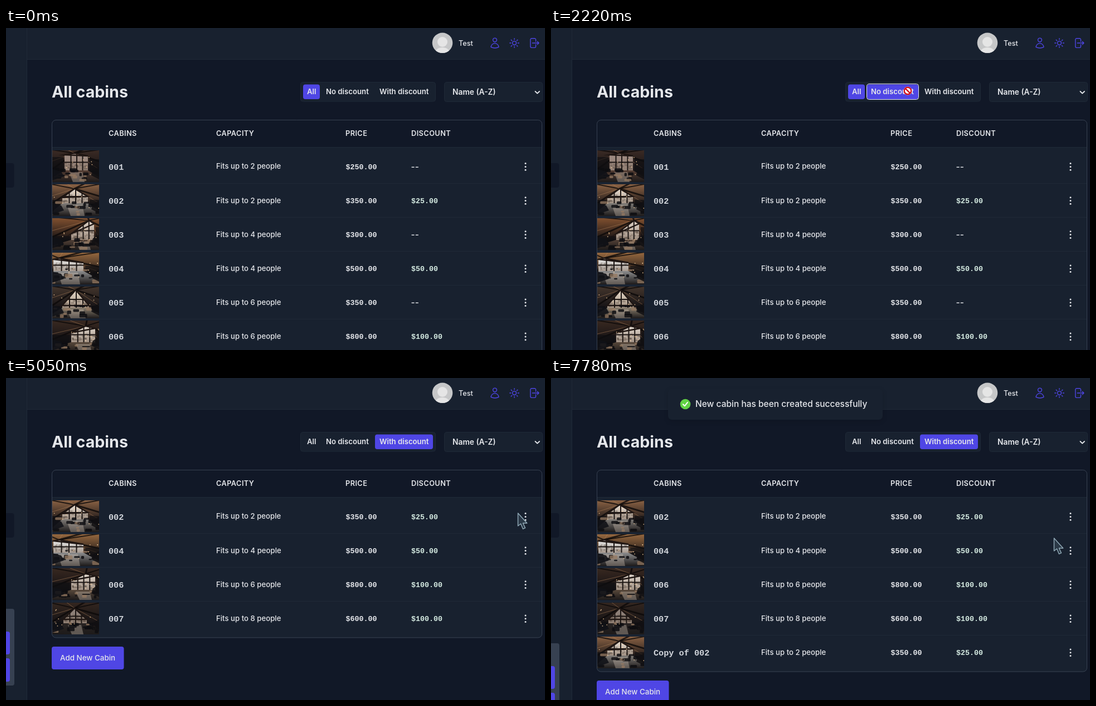
Write an HTML page with a canvas that moves like this. It is 967 px wide and 579 px high and loops after 8000 ms.

```html
<!DOCTYPE html>
<html lang="en">
<head>
<meta charset="utf-8">
<title>All cabins</title>
<style>
html, body { margin: 0; width: 100%; height: 100%; overflow: hidden; background: #111827; }
canvas { display: block; }
</style>
</head>
<body>
<canvas id="stage" width="967" height="579"></canvas>
<script>
const LOOP = 8000, STEP = 70;
const PANEL = '#18212f', PAGE = '#111827', LINE = '#1f2937', EDGE = '#374151';
const BRAND = '#4f46e5', TEXT = '#e5e7eb', SOFT = '#d1d5db', MINT = '#d5ebe2';
const SANS = 'Inter, "Open Sans", sans-serif';
const MONO = '"Liberation Mono", "DejaVu Sans Mono", monospace';

const stage = document.getElementById('stage');
let g = stage.getContext('2d');

// ---------- helpers ----------
const clamp = v => Math.max(0, Math.min(1, v));
const ramp = (t, a, b) => clamp((t - a) / (b - a));
const during = (t, a, b) => t >= a && t < b;
const inside = (p, x, y, w, h) => p.x >= x && p.x < x + w && p.y >= y && p.y < y + h;

function rect(x, y, w, h, color) {
  g.fillStyle = color;
  g.fillRect(x, y, w, h);
}

function round(x, y, w, h, r, fill, stroke) {
  g.beginPath();
  g.roundRect(x, y, w, h, r);
  if (fill) { g.fillStyle = fill; g.fill(); }
  if (stroke) { g.strokeStyle = stroke; g.lineWidth = 1; g.stroke(); }
}

function disc(x, y, r, color) {
  g.beginPath();
  g.arc(x, y, r, 0, Math.PI * 2);
  g.fillStyle = color;
  g.fill();
}

function poly(points, color) {
  g.beginPath();
  points.forEach(([x, y]) => g.lineTo(x, y));
  g.closePath();
  if (color) { g.fillStyle = color; g.fill(); }
}

function label(s, x, cy, size, weight = 400, color = TEXT, family = SANS, spacing = 0) {
  g.font = `${weight} ${size}px ${family}`;
  g.letterSpacing = spacing + 'px';
  g.fillStyle = color;
  g.fillText(s, x, cy + size * (family === MONO ? 0.33 : 0.36));
}

function shade(y0, y1, a, b) {
  const s = g.createLinearGradient(0, y0, 0, y1);
  s.addColorStop(0, a);
  s.addColorStop(1, b);
  return s;
}

function random(seed) {
  return () => {
    seed = (seed * 16807) % 2147483647;
    return seed / 2147483647;
  };
}

// ---------- room thumbnails ----------
const W = 84, H = 57;
// wood, sky, floor, then window: left, right, left top, apex x, apex y, right top, bottom
const ROOMS = [
  ['#3a2a24', '#a08c84', '#5c4236', 22, 64, 8, 40, 5, 10, 36],
  ['#8a6244', '#e6ddd2', '#8d8984', 18, 64, 24, 40, 8, 22, 34],
  ['#80502f', '#dfd3c8', '#5a463a', 34, 75, 28, 66, 4, 10, 39],
  ['#96683f', '#eceded', '#9a9b9c', 2, 56, 12, 12, 10, 18, 33],
  ['#43352c', '#e8dccb', '#9b8f7c', 18, 66, 34, 42, 6, 34, 38],
  ['#382820', '#e0d7cd', '#625040', 34, 77, 22, 60, 10, 14, 39],
  ['#33261f', '#8c807a', '#2b2624', 20, 62, 30, 40, 10, 30, 37],
  ['#2b2523', '#dfdfdd', '#75675a', 16, 54, 20, 46, 6, 6, 38]
];

function room([wood, sky, floor, l, r, tl, ax, ay, tr, b], i) {
  const c = document.createElement('canvas');
  c.width = W;
  c.height = H;
  g = c.getContext('2d');
  const rnd = random(911 + i * 577);

  rect(0, 0, W, H, shade(0, 40, wood, '#131114'));
  for (let k = 0; k <= 8; k++) {
    g.strokeStyle = k % 3 ? 'rgba(12,9,9,.8)' : 'rgba(190,140,95,.45)';
    g.lineWidth = 1 + k % 3;
    g.beginPath();
    g.moveTo(ax, ay);
    g.lineTo(k * W / 4 - W / 2, k % 2 ? -4 : 34);
    g.stroke();
  }
  rect(0, tl + 4, l - 2, b - tl, 'rgba(14,14,17,.65)');
  rect(r + 3, tr + 6, W - r, b - tr, 'rgba(14,14,17,.65)');

  g.save();
  poly([[l, b], [l, tl], [ax, ay], [r, tr], [r, b]], shade(ay, b + 8, sky, '#8f7d6f'));
  g.clip();
  for (let k = 0; k < 26; k++) {
    rect(l + rnd() * (r - l), b - 4 - rnd() * 12, 2 + rnd() * 4, 3, 'rgba(75,60,50,.3)');
  }
  g.fillStyle = '#1b1513';
  for (let k = 1; k < 4; k++) g.fillRect(l + (r - l) * k / 4, 0, 2, H);
  g.fillRect(0, (ay + b) / 2, W, 2);
  g.restore();
  poly([[l, tl], [ax, ay], [r, tr]]);
  g.strokeStyle = '#1f1613';
  g.lineWidth = 2.4;
  g.stroke();

  poly([[0, 49], [l, b], [r, b], [W, 48], [W, H], [0, H]], shade(b - 3, H, floor, '#1d1a1a'));
  poly([[l + 8, b + 3], [r - 10, b + 3], [r - 6, H], [l + 15, H]], 'rgba(232,218,202,.32)');
  for (let k = 0; k < 18; k++) {
    const x = rnd() * W, y = b + rnd() * (H - b) - 5;
    round(x - 6, y, 4 + rnd() * 11, 2 + rnd() * 5, 1.5, k % 4 ? 'rgba(13,13,16,.85)' : 'rgba(150,122,98,.75)');
  }
  poly([[0, 34], [16, 38], [21, 47], [0, 54]], 'rgba(17,18,23,.9)');
  poly([[W, 30], [73, 36], [70, 45], [W, 52]], 'rgba(17,16,18,.88)');
  for (let k = 0; k < 9; k++) disc(rnd() * W, 12 + rnd() * 32, 0.9, 'rgba(255,212,160,.8)');
  return c;
}

const photos = ROOMS.map(room);
g = stage.getContext('2d');

// ---------- data ----------
const cabin = (id, people, price, discount) =>
  ({ id, name: '00' + id, people, price: '$' + price + '.00', discount });
const ALL = [
  cabin(1, 2, '250', 0), cabin(2, 2, '350', 25), cabin(3, 4, '300', 0), cabin(4, 4, '500', 50),
  cabin(5, 6, '350', 0), cabin(6, 6, '800', 100), cabin(7, 8, '600', 100), cabin(8, 10, '1,400', 0)
];
const PLAIN = ALL.filter(c => !c.discount);
const REDUCED = ALL.filter(c => c.discount);
const COPIED = [...REDUCED, { ...ALL[1], name: 'Copy of 002' }];

const rowsAt = t => t < 2290 ? ALL : t < 3690 ? PLAIN : t < 7510 ? REDUCED : COPIED;
const menuOpen = t => during(t, 5540, 7300);

// ---------- pointer ----------
const TRACK = [
  [130, 873, 184], [480, 928, 262], [560, 932, 280], [760, 934, 261], [900, 934, 260],
  [1439, 934, 260], [1440, 871, 213], [2080, 640, 113], [2290, 640, 113], [2890, 714, 109],
  [4640, 714, 109], [5050, 918, 243], [5270, 931, 245], [6080, 931, 245], [6570, 902, 288],
  [LOOP, 902, 288]
];
const CLICKS = [[2080, 2220], [3620, 3830], [5470, 5610], [7230, 7300]];

function pointer(t) {
  const i = TRACK.findIndex((k, n) => n < TRACK.length - 1 && t < TRACK[n + 1][0]);
  const [t0, x0, y0] = TRACK[i], [t1, x1, y1] = TRACK[i + 1];
  const u = clamp(Math.floor((t - t0) / STEP) * STEP / (t1 - t0));
  const e = u * u * (3 - 2 * u);
  return { x: x0 + (x1 - x0) * e, y: y0 + (y1 - y0) * e };
}

function shape(p, t) {
  const active = t < 2220 ? 0 : t < 3760 ? 1 : 2;
  const over = TABS.findIndex(b => inside(p, b.x, 101, b.w, 27));
  if (over >= 0) return over === active ? 'no' : 'hand';
  if (menuOpen(t) && inside(p, 796, 271, 136, 111)) return 'hand';
  return inside(p, 920, 235, 27, 29) ? 'hand' : 'arrow';
}

const HAND = new Path2D('M6 17V2.5Q8 -.8 10.3 2.5V10Q12.6 7.6 14.4 10.2V11Q16.8 9.2 18.4 11.8V13' +
  'Q21 11.6 22 14V20L19.4 25V29H8.6V26L3 20L.8 16Q1 12.8 4 14.2Z');
const FINGERS = new Path2D('M10.3 10V16M14.4 11V16M18.4 13V17');
const ARROW = new Path2D('M0 0V23L5 19L9 28.4L13 26.6L9 18H16.3Z');

function drawPointer(t) {
  if (t < 130) return;
  const p = pointer(t), kind = shape(p, t);
  if (CLICKS.some(([a, b]) => during(t, a, b))) disc(p.x - 1, p.y - 1, 11, 'rgba(188,180,8,.72)');
  g.save();
  g.translate(Math.round(p.x), Math.round(p.y));
  if (kind === 'no') {
    disc(0, 0, 7.6, '#fff');
    g.strokeStyle = '#d3121c';
    g.lineWidth = 2.4;
    g.beginPath();
    g.arc(0, 0, 6.2, 0, Math.PI * 2);
    g.moveTo(-4.4, -4.4);
    g.lineTo(4.4, 4.4);
    g.stroke();
  } else {
    const hand = kind === 'hand', path = hand ? HAND : ARROW;
    if (hand) g.translate(-8, 0);
    else g.translate(0.5, 0);
    g.lineJoin = 'round';
    g.lineWidth = 1.4;
    g.fillStyle = hand ? '#24374a' : '#2b3947';
    g.strokeStyle = '#92abb8';
    g.fill(path);
    g.stroke(path);
    if (hand) g.stroke(FINGERS);
  }
  g.restore();
}

// ---------- page ----------
const ICONS = [
  [877, 'M15.75 6a3.75 3.75 0 1 1-7.5 0 3.75 3.75 0 0 1 7.5 0ZM4.5 20.1a7.5 7.5 0 0 1 15 0A17.9 17.9 0 0 1 12 21.75c-2.7 0-5.2-.6-7.5-1.65Z'],
  [912, 'M12 3v2.25m6.36.39-1.6 1.6M21 12h-2.25m-.39 6.36-1.6-1.6M12 18.75V21m-4.77-4.23-1.6 1.6M5.25 12H3m4.23-4.77L5.64 5.64M15.75 12a3.75 3.75 0 1 1-7.5 0 3.75 3.75 0 0 1 7.5 0Z'],
  [947, 'M15.75 9V5.25A2.25 2.25 0 0 0 13.5 3h-6a2.25 2.25 0 0 0-2.25 2.25v13.5A2.25 2.25 0 0 0 7.5 21h6a2.25 2.25 0 0 0 2.25-2.25V15m3 0 3-3m0 0-3-3m3 3H9']
].map(([x, d]) => ({ x, path: new Path2D(d) }));

const TABS = [
  { s: 'All', x: 533, w: 30, tx: 540, on: t => 1 - ramp(t, 2220, 2520) },
  { s: 'No discount', x: 567, w: 92, tx: 574, on: t => ramp(t, 1960, 2160) - ramp(t, 3690, 3970) },
  { s: 'With discount', x: 662, w: 104, tx: 670, on: t => ramp(t, 2500, 2800) }
];

function drawFrame(bottom) {
  rect(0, 0, 967, 579, PAGE);
  rect(0, 0, 37, 579, PANEL);
  rect(38, 0, 929, 56, PANEL);
  rect(37, 0, 1, 579, LINE);
  rect(38, 56, 929, 1, LINE);
  round(-10, 243, 24.5, 44, 4, PAGE);

  const y = Math.round(bottom) - 52;
  round(-10, y, 25, 138, 4, EDGE);
  round(-10, y + 41, 17, 41, 4, BRAND);
  round(-10, y + 89, 17, 42, 4, BRAND);

  g.save();
  disc(783, 26.8, 18.3, '#c6c7c8');
  g.clip();
  disc(783, 25, 9, '#e5e5e5');
  g.beginPath();
  g.ellipse(783, 46, 14, 11, 0, 0, Math.PI * 2);
  g.fill();
  g.restore();
  label('Test', 812, 27, 12.7, 500);

  g.strokeStyle = BRAND;
  g.lineCap = g.lineJoin = 'round';
  for (const { x, path } of ICONS) {
    g.save();
    g.translate(x - 11, 16);
    g.scale(0.92, 0.92);
    g.lineWidth = 1.5;
    g.stroke(path);
    g.restore();
  }
}

function drawTools(t) {
  label('All cabins', 82, 114.5, 28.6, 700);
  round(528.5, 97.5, 242, 34.5, 4, PANEL, LINE);
  for (const b of TABS) {
    g.globalAlpha = clamp(b.on(t));
    round(b.x, 101.5, b.w, 26.5, 4, BRAND);
    g.globalAlpha = 1;
    if (b === TABS[1] && during(t, 2080, 2290)) round(566.5, 100.5, 93, 28, 4, null, TEXT);
    label(b.s, b.tx, 114.3, 13.2, 600);
  }
  round(786.5, 97.5, 176, 35, 4, PANEL, LINE);
  label('Name (A-Z)', 801, 115, 13.8, 600);
  g.strokeStyle = TEXT;
  g.lineWidth = 1.9;
  g.beginPath();
  g.moveTo(949.5, 114);
  g.lineTo(953.2, 117.6);
  g.lineTo(957, 114);
  g.stroke();
}

function drawTable(rows, bottom, t) {
  g.save();
  g.beginPath();
  g.roundRect(82, 165, 880, bottom - 165, 7);
  g.clip();
  rect(82, 165, 880, 49, PAGE);
  rect(82, 214, 880, 500, PANEL);
  rect(82, 214, 880, 1, LINE);
  [['CABINS', 184], ['CAPACITY', 377], ['PRICE', 609], ['DISCOUNT', 727]]
    .forEach(([s, x]) => label(s, x, 189.8, 12.8, 600, TEXT, SANS, 0.4));

  const hover = ramp(t, 400, 600) - ramp(t, 1430, 1560) + ramp(t, 5060, 5260) - ramp(t, 6150, 6350);
  g.globalAlpha = clamp(hover);
  round(917.5, 235, 29.5, 29, 4, LINE);
  g.globalAlpha = 1;

  rows.forEach((c, i) => {
    const y = 249 + 61.1 * i;
    g.drawImage(photos[c.id - 1], 83, Math.round(y - 28.8));
    label(c.name, 184, y + 0.5, 15.2, 700, SOFT, MONO);
    label(`Fits up to ${c.people} people`, 377, y - 0.3, 13.2, 500);
    label(c.price, 609.5, y + 0.5, 13.3, 700, TEXT, MONO);
    if (c.discount) label(`$${c.discount}.00`, 727, y + 0.5, 13.3, 700, MINT, MONO);
    else label('--', 726.5, y, 15.5, 500);
    for (const d of [-5.8, 0, 5.8]) disc(932, y + 0.4 + d, 1.5, TEXT);
    if (i < rows.length - 1) rect(82, Math.round(y + 30), 880, 1, LINE);
  });
  g.restore();
  round(82.5, 165.5, 879, bottom - 166, 7, null, EDGE);

  round(82, bottom + 15.5, 129.5, 41, 4, BRAND);
  label('Add New Cabin', 97, bottom + 36, 13.4, 500);
}

function drawMenu(t) {
  if (!menuOpen(t)) return;
  g.save();
  g.shadowColor = 'rgba(0,0,0,.36)';
  g.shadowBlur = 24;
  g.shadowOffsetY = 6;
  round(796, 271, 136, 111, 5, '#17202d');
  g.restore();
  if (t >= 6220) round(796, 271, 136, 38, 4, PAGE);
  if (t >= 7230) {
    g.strokeStyle = '#f3f4f6';
    g.lineWidth = 1;
    g.strokeRect(795.5, 271.5, 136, 37);
  }
  ['Duplicate', 'Edit', 'Delete'].forEach((s, i) => label(s, 847, 290 + 37 * i, 13.5, 500));

  const grey = '#6b7280';
  round(819.5, 284, 8, 8, 1.5, grey);
  round(822, 286.5, 10, 10, 2, t >= 6220 ? PAGE : PANEL);
  round(823, 287.5, 8, 8, 1.5, grey);
  poly([[819, 333], [820, 329], [827.5, 321.5], [830.5, 324.5], [823, 332]], grey);
  disc(830, 322, 1.9, grey);
  round(820, 359, 11, 2, 1, grey);
  round(823, 357.3, 5, 2, 1, grey);
  poly([[821, 361.5], [830, 361.5], [829.3, 370], [821.7, 370]], grey);
  for (const x of [823, 825.2, 827.4]) rect(x, 363, 0.8, 5, PANEL);
}

function drawToast(t) {
  if (t < 7440) return;
  const u = 1 - Math.pow(1 - ramp(t, 7440, 7770), 3);
  const k = 0.6 + 0.4 * u;
  g.save();
  g.globalAlpha = 0.5 + 0.5 * u;
  g.translate(402.5, 47 - 114 * (1 - u));
  g.scale(k, k);
  g.translate(-402.5, -47);
  g.save();
  g.shadowColor = 'rgba(0,0,0,.12)';
  g.shadowBlur = 10;
  g.shadowOffsetY = 3;
  round(210, 19, 385, 56, 7, PANEL);
  g.restore();
  disc(241, 47, 9.3 * ramp(t, 7500, 7700), '#61d345');
  if (t >= 7700) {
    g.strokeStyle = '#fff';
    g.lineWidth = 2;
    g.beginPath();
    g.moveTo(236.8, 47.3);
    g.lineTo(239.8, 50.3);
    g.lineTo(245, 43.8);
    g.stroke();
  }
  label('New cabin has been created successfully', 259, 46.8, 15.5, 500);
  g.restore();
}

function draw(t) {
  const rows = rowsAt(t), bottom = 223 + 61.1 * rows.length;
  drawFrame(bottom);
  drawTools(t);
  drawTable(rows, bottom, t);
  drawMenu(t);
  drawToast(t);
  drawPointer(t);
}

const start = performance.now();
function tick() {
  draw((performance.now() - start) % LOOP);
  requestAnimationFrame(tick);
}
tick();
</script>
</body>
</html>
```
